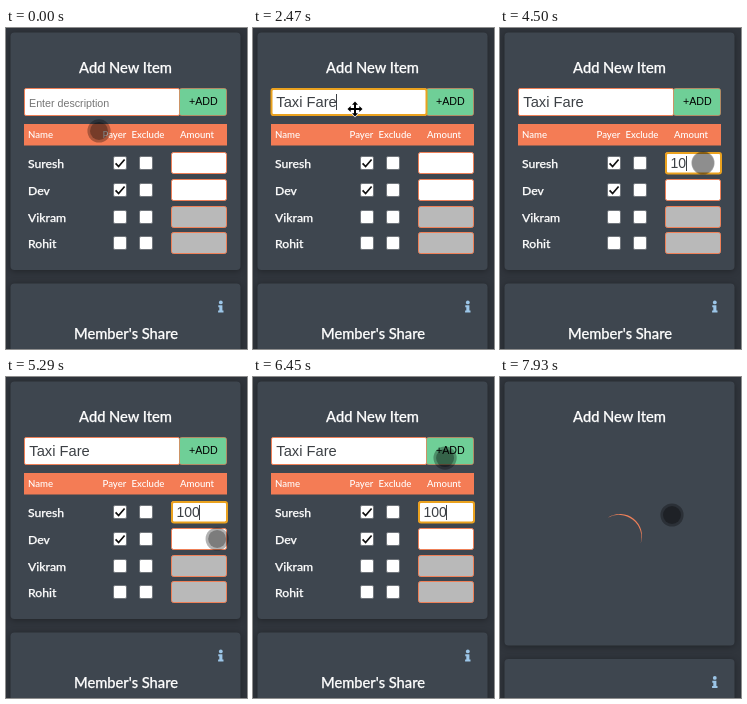
An HTML page for the animation above (8 s loop, 241x321 px).

```html
<!DOCTYPE html>
<html lang="en">
<head>
<meta charset="utf-8">
<title>Add New Item</title>
<style>
html, body { margin: 0; width: 100%; height: 100%; overflow: hidden; background: #30353c; }
svg { display: block; width: 100vw; height: 100vh; }
text { font-family: Lato, sans-serif; font-weight: 500; fill: #fff; }
.title, .name { stroke: #fff; stroke-width: .25; }
.title { font-size: 14.7px; text-anchor: middle; }
.head { font-size: 9.6px; }
.name { font-size: 12.2px; }
.field { font-family: "Liberation Sans", Arial, sans-serif; font-weight: 400; fill: #3c4045; }
.card { fill: #3e464f; filter: drop-shadow(0 1px 3px #0005); }
.box { fill: #fff; stroke: #ee8058; }
.ring { fill: none; stroke: #eaa21f; stroke-width: 2; }
.caret { stroke: #3c4045; stroke-width: 1; }
</style>
</head>
<body>
<svg id="stage" viewBox="0 0 241 321" preserveAspectRatio="none">
  <rect width="241" height="321" fill="#30353c"/>
  <rect id="card" class="card" x="4.5" y="4.5" width="230" height="237.5" rx="4"/>
  <text class="title" x="119.5" y="45">Add New Item</text>

  <g id="form">
    <rect class="box" x="18.5" y="60.5" width="155" height="27" rx="1.5"/>
    <rect x="173.5" y="60.5" width="47" height="27" rx="2" fill="#6fcf97" stroke="#d98a5f" stroke-width=".7"/>
    <text class="field" x="183" y="77" font-size="10.7" style="fill:#000">+ADD</text>
    <text id="hint" class="field" x="23" y="79" font-size="10.7" style="fill:#757575">Enter description</text>
    <text id="item" class="field" x="23.3" y="79" font-size="14.7"></text>
    <rect id="itemRing" class="ring" x="18.5" y="61" width="155" height="26" rx="2"/>
    <rect x="18" y="96" width="203" height="21.5" fill="#f47c55"/>
    <g class="head">
      <text x="22" y="110">Name</text>
      <text x="96.5" y="110">Payer</text>
      <text x="125.5" y="110">Exclude</text>
      <text x="174" y="110">Amount</text>
    </g>
    <g id="rows"></g>
    <text id="amount" class="field" x="170.5" y="140" font-size="14"></text>
    <rect id="amountRing" class="ring" x="166" y="125" width="55" height="20.5" rx="2"/>
    <line id="caret" class="caret"/>
  </g>

  <path id="spinner" fill="#ef8059"/>

  <g id="lower">
    <rect class="card" x="4.5" y="255.5" width="230" height="100" rx="4"/>
    <g fill="#9cc6e8">
      <circle cx="214.8" cy="274.4" r="1.9"/>
      <path d="M212.3 277.3h4.1v5.2h1.1v2h-5.4v-2h1.2v-3.2h-1z"/>
    </g>
    <text class="title" x="120" y="311">Member's Share</text>
  </g>

  <g id="pointer">
    <g id="touch">
      <circle r="11.6" fill="#000" opacity=".3"/>
      <circle id="core" r="9" fill="#000"/>
    </g>
    <path id="move" fill="#000" stroke="#fff" stroke-width="1.2" paint-order="stroke" stroke-linejoin="round"
      d="M0-7.5l3 3.2h-2v3.3h3.3v-2l3.2 3-3.2 3v-2h-3.3v3.3h2l-3 3.2-3-3.2h2v-3.3h-3.3v2l-3.2-3 3.2-3v2h3.3v-3.3h-2z"/>
  </g>
</svg>
<script>
const LOOP = 8000, LOADING = 6600;
const $ = id => document.getElementById(id);
const show = (id, on) => $(id).setAttribute("visibility", on ? "visible" : "hidden");

const people = [["Suresh", true], ["Dev", true], ["Vikram", false], ["Rohit", false]];

function checkbox(x, y, on) {
  return `<rect x="${x + .5}" y="${y - 6.5}" width="13" height="13" rx="1.5" fill="#fff" stroke="#70757b"/>` +
    (on ? `<path d="M${x + 2.6} ${y + .3}l3 3.2 6-7" fill="none" stroke="#111" stroke-width="1.7"/>` : "");
}

$("rows").innerHTML = people.map(([name, payer], i) => {
  const y = Math.round(135 + i * 26.8);
  return `<text class="name" x="22" y="${y + 4.5}">${name}</text>` +
    checkbox(107, y, payer) + checkbox(133, y, false) +
    `<rect class="box" x="165.5" y="${y - 10.5}" width="55" height="21" rx="2"${payer ? "" : ' style="fill:#b9b9b9"'}/>`;
}).join("");

// [time, text after the key press]
const itemKeys = [[390, ""], [1190, "T"], [1430, "Ta"], [1510, "Tax"], [1590, "Taxi"],
  [1910, "Taxi\u00a0"], [2080, "Taxi F"], [2230, "Taxi Far"], [2470, "Taxi Fare"]];
const amountKeys = [[3810, ""], [4350, "1"], [4500, "10"], [4970, "100"]];

// [time, x, y]
const path = [[0, 93, 103], [70, 94, 101], [390, 102, 82], [570, 102, 81], [2860, 102, 81],
  [3200, 150, 128], [3510, 198, 147], [3740, 203, 135], [4900, 203, 135], [5230, 226, 160],
  [5600, 136, 172], [5750, 126, 164], [5830, 121, 158], [6200, 158, 116], [6480, 196, 77],
  [6600, 196, 76], [6840, 182, 120], [7380, 172, 138], [8000, 172, 138]];

const lastKey = (keys, t) => keys.filter(k => k[0] <= t).pop() || [0, ""];

function pointerAt(t) {
  const i = path.findIndex(p => p[0] > t);
  const a = path[i - 1], b = path[i], k = (t - a[0]) / (b[0] - a[0]);
  return [a[1] + (b[1] - a[1]) * k, a[2] + (b[2] - a[2]) * k];
}

function drawCaret(field, top, bottom, since, t) {
  const text = $(field);
  const x = Math.floor(+text.getAttribute("x") + (text.textContent ? text.getComputedTextLength() : 0)) + .5;
  const ends = { x1: x, x2: x, y1: top, y2: bottom };
  for (const key in ends) $("caret").setAttribute(key, ends[key]);
  show("caret", t < LOADING && (t - since) % 1000 < 500);
}

// Arc that thins out towards both ends
function crescent(mid) {
  const spread = 72, at = deg => {
    const a = deg * Math.PI / 180;
    return `${120 + 22 * Math.cos(a)} ${159 + 22 * Math.sin(a)}`;
  };
  const from = at(mid - spread), to = at(mid + spread);
  return `M${from}A22 22 0 0 1 ${to}A22.7 22.7 0 0 0 ${from}z`;
}

function render(t) {
  const loading = t >= LOADING;
  const onItem = t >= 390 && t < 3810, onAmount = t >= 3810 && t < 6530;
  const item = lastKey(itemKeys, t), amount = lastKey(amountKeys, t);

  show("form", !loading);
  show("spinner", loading);
  $("card").setAttribute("height", loading ? 264 : 237.5);
  $("lower").setAttribute("transform", `translate(0 ${loading ? 26.5 : 0})`);

  $("item").textContent = item[1];
  $("amount").textContent = amount[1];
  show("hint", !item[1] && !loading);
  show("itemRing", onItem);
  show("amountRing", onAmount);
  if (onItem) drawCaret("item", 66, 82, item[0], t);
  else if (onAmount) drawCaret("amount", 128, 143, amount[0], t);
  else show("caret", false);

  if (loading) $("spinner").setAttribute("d", crescent(-103 + (t - 6840) * 360 / 955));

  const arrows = t >= 570 && t < 2940, resting = t >= 3740 && t < 4970;
  $("pointer").setAttribute("transform", `translate(${pointerAt(t)})`);
  show("move", arrows);
  show("touch", !arrows);
  $("core").setAttribute("r", resting ? 11 : 9);
  $("core").setAttribute("opacity", resting ? .2 : .3);
}

const start = performance.now();
function tick() {
  render((performance.now() - start) % LOOP);
  requestAnimationFrame(tick);
}
tick();
</script>
</body>
</html>
```
